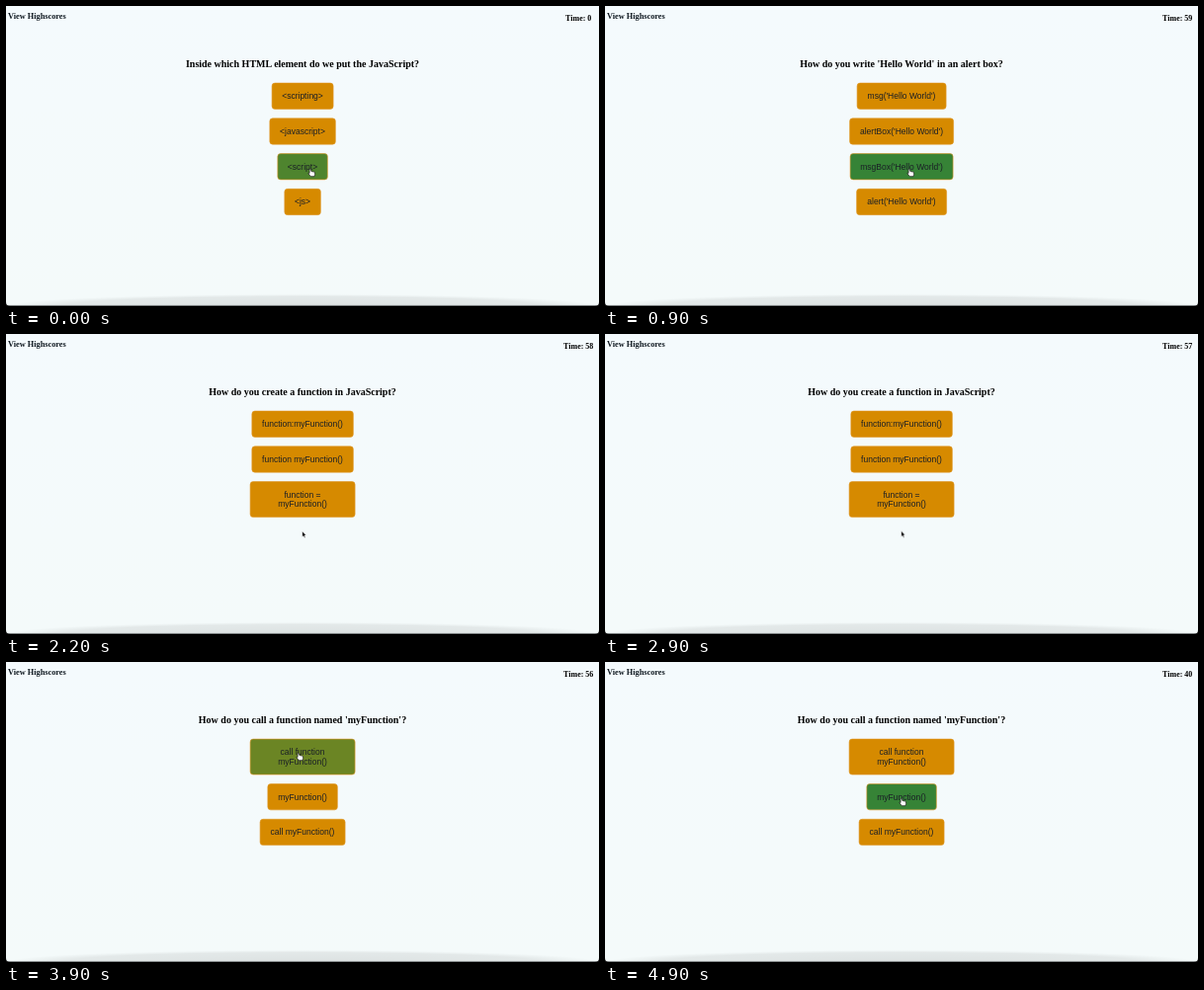
An HTML page for the animation above (5 s loop, 600 px wide and 304 px high).

```html
<!DOCTYPE html>
<html lang="en">
<head>
<meta charset="utf-8">
<title>JavaScript quiz</title>
<style>
html, body { margin: 0; width: 100%; height: 100%; overflow: hidden; background: #f4fafb; }
svg { display: block; width: 100vw; height: 100vh; }
text { text-anchor: middle; }
.bold { font: bold 10px "Liberation Serif", Times, serif; fill: #000; }
.link { font-size: 8.3px; text-anchor: start; fill: #111a22; }
.time { font-size: 8px; }
.btn rect { fill: #d68a00; stroke: #df9420; stroke-width: .6; }
.btn text { font: 8.53px "Liberation Sans", Arial, sans-serif; fill: #1a1f26; }

.show { visibility: hidden; animation: 5s step-end infinite; }
.q1 { animation-name: q1; }
.q2 { animation-name: q2; }
.q3 { animation-name: q3; }
.q4 { animation-name: q4; }
@keyframes q1 { 0% { visibility: visible } 12%, to { visibility: hidden } }
@keyframes q2 { 12% { visibility: visible } 44%, to { visibility: hidden } }
@keyframes q3 { 44% { visibility: visible } 74%, to { visibility: hidden } }
@keyframes q4 { 74%, to { visibility: visible } }

.s0 { animation-name: s0; }
.s59 { animation-name: s59; }
.s58 { animation-name: s58; }
.s57 { animation-name: s57; }
.s56 { animation-name: s56; }
.s40 { animation-name: s40; }
@keyframes s0 { 0% { visibility: visible } 10%, to { visibility: hidden } }
@keyframes s59 { 10% { visibility: visible } 30%, to { visibility: hidden } }
@keyframes s58 { 30% { visibility: visible } 50%, to { visibility: hidden } }
@keyframes s57 { 50% { visibility: visible } 70%, to { visibility: hidden } }
@keyframes s56 { 70% { visibility: visible } 90%, to { visibility: hidden } }
@keyframes s40 { 90%, to { visibility: visible } }

/* hover fades */
.btn rect { animation: 5s linear infinite; }
.q1 .b2 rect { animation-name: script; }
.q2 .b2 rect { animation-name: msgBox; }
.q2 .b3 rect { animation-name: alertFn; }
.q3 .b0 rect { animation-name: colon; }
.q4 .b0 rect { animation-name: callFn; }
.q4 .b1 rect { animation-name: plainFn; }
@keyframes script { 0%, 2% { fill: #4e842e } 4%, to { fill: #368336 } }
@keyframes msgBox { 0%, 12% { fill: #d68a00 } 18%, 33% { fill: #368336 } 39%, to { fill: #d68a00 } }
@keyframes alertFn { 0%, 33% { fill: #d68a00 } 39%, to { fill: #368336 } }
@keyframes colon { 0%, 62% { fill: #d68a00 } 66%, to { fill: #4e842e } }
@keyframes callFn { 0%, 74% { fill: #d68a00 } 80%, 88% { fill: #368336 } 94%, to { fill: #d68a00 } }
@keyframes plainFn { 0%, 88% { fill: #d68a00 } 94%, to { fill: #368336 } }

.pointer { animation: move 5s linear infinite; }
@keyframes move {
  0%, 30% { transform: translate(309px, 169px) }
  36%, 58% { transform: translate(300px, 204px) }
  64%, 86% { transform: translate(297px, 96px) }
  88% { transform: translate(300px, 132px) }
  90%, to { transform: translate(301px, 142px) }
}
.hand { fill: #fff; stroke: #111; stroke-width: .65; animation: hand 5s step-end infinite; }
.arrow { fill: #000; stroke: #fff; stroke-width: .4; animation-name: arrow; }
@keyframes hand { 0% { visibility: visible } 44% { visibility: hidden } 61%, to { visibility: visible } }
@keyframes arrow { 44% { visibility: visible } 61%, to { visibility: hidden } }
</style>
</head>
<body>
<svg id="stage" viewBox="0 0 600 304" preserveAspectRatio="none">
  <defs>
    <linearGradient id="sky" x1="0" y1="0" x2="0" y2="1">
      <stop offset="0" stop-color="#f4fafd"/>
      <stop offset="1" stop-color="#f4fafa"/>
    </linearGradient>
    <radialGradient id="shade" cx=".5" cy="1" r=".5" gradientTransform="matrix(1 0 0 2 0 -1)">
      <stop offset="0" stop-color="#000" stop-opacity=".1"/>
      <stop offset=".8" stop-color="#000" stop-opacity=".07"/>
      <stop offset="1" stop-color="#000" stop-opacity="0"/>
    </radialGradient>
  </defs>
  <rect width="600" height="304" fill="url(#sky)"/>
  <rect y="292" width="600" height="12" fill="url(#shade)"/>
  <path d="M0 303.5H600" stroke="#8d9293"/>
  <path d="M0 300Q0 304 4 304H0zM600 300Q600 304 596 304H600z" fill="#111"/>
  <text class="bold link" x="2" y="13.4">View Highscores</text>
  <g id="clock"></g>
  <g id="quiz"></g>
  <g class="pointer">
    <path class="hand" d="M-1.9-3.5q.9-.7 1.4.3l.5 2q1-.5 1.3.1 .9-.4 1.2.2 1-.1 1 .8l.1 1.8-.6 2h-3.6l-2.6-3q.1-.9 1.3-.2z"/>
    <path class="show arrow" d="M-.2-4v5.6l1.3-1.1 .9 2 .9-.4-.9-2h1.6z"/>
  </g>
</svg>
<script>
const NS = "http://www.w3.org/2000/svg";
const byId = id => document.getElementById(id);

function add(parent, tag, attrs, text = "") {
  const el = document.createElementNS(NS, tag);
  for (const name in attrs) el.setAttribute(name, attrs[name]);
  el.textContent = text;
  return parent.appendChild(el);
}

// each answer: label (| breaks the line), button width
const questions = [
  ["Inside which HTML element do we put the JavaScript?",
    ["<scripting>", 62], ["<javascript>", 66.5], ["<script>", 50.5], ["<js>", 36.5]],
  ["How do you write 'Hello World' in an alert box?",
    ["msg('Hello World')", 90], ["alertBox('Hello World')", 105],
    ["msgBox('Hello World')", 104], ["alert('Hello World')", 91]],
  ["How do you create a function in JavaScript?",
    ["function:myFunction()", 102.5], ["function myFunction()", 102.5], ["function =|myFunction()", 106]],
  ["How do you call a function named 'myFunction'?",
    ["call function|myFunction()", 106], ["myFunction()", 70.5], ["call myFunction()", 86]]
];

questions.forEach(([title, ...answers], q) => {
  const group = add(byId("quiz"), "g", { class: `show q${q + 1}` });
  add(group, "text", { class: "bold", x: 300, y: 62 }, title);
  let y = 78.1;
  answers.forEach(([label, width], i) => {
    const lines = label.split("|");
    const height = 16.6 + 9.7 * lines.length;
    const btn = add(group, "g", { class: `btn b${i}` });
    add(btn, "rect", { x: 300.1 - width / 2, y, width, height, rx: 3 });
    lines.forEach((line, n) => add(btn, "text", { x: 300, y: y + 16.1 + 9.7 * n }, line));
    y += height + 9.45;
  });
});

for (const s of [0, 59, 58, 57, 56, 40])
  add(byId("clock"), "text", { class: `bold time show s${s}`, x: 579.2, y: 14.6 }, `Time: ${s}`);
</script>
</body>
</html>
```
